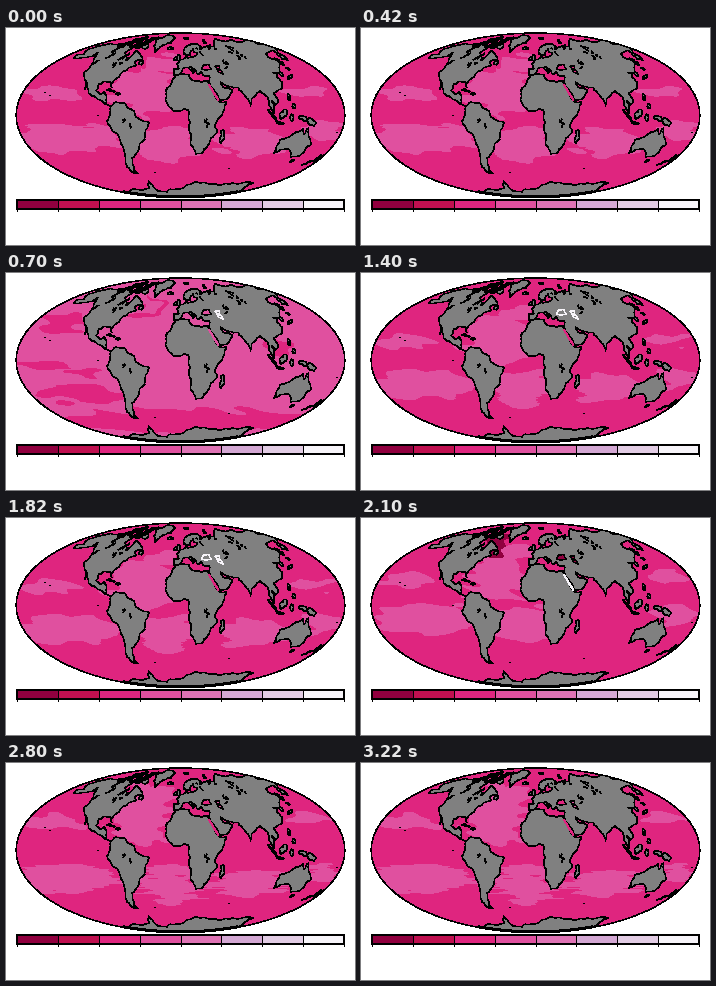
A matplotlib script that plays this animation: 349x217 px, repeating every 3.5 s.

```python
import numpy as np
import matplotlib.pyplot as plt
from matplotlib.animation import FuncAnimation
from matplotlib.colors import to_rgb
from matplotlib.patches import Ellipse, Polygon, Rectangle

W, H, DPI = 349, 217, 100
PX = 72 / DPI
HAIR = 0.45 * PX
CX, CY, RX, RY = 174.5, 87.3, 164.3, 82.3
SCALE = ["#91003f", "#c01050", "#df257f", "#e0509f",
         "#df73b5", "#d4a8d4", "#e2cce4", "#f7f4f9"]
WINE, DARK, LIGHT, PALE = SCALE[0], SCALE[2], SCALE[3], SCALE[7]
LAND = "#808080"
rng = np.random.default_rng(4)

# Key coast points as alternating longitude, latitude; detail is fractal
africa = [-6, 36, 10, 37, 11, 34, 20, 31, 32, 31, 34, 28, 37, 21, 43, 12, 51, 12,
          48, 5, 39, -7, 41, -15, 35, -20, 32, -28, 27, -34, 19, -35, 12, -17,
          9, -1, 9, 4, 4, 6, -8, 4, -17, 14, -17, 22, -10, 31]
europe = [34, 31, 36, 36, 28, 37, 27, 40, 23, 37, 19, 42, 13, 45, 18, 40, 16, 38,
          10, 44, 3, 43, -2, 37, -9, 37, -9, 43, -2, 43, -5, 48, 8, 54, 9, 57,
          11, 54, 20, 55, 29, 60, 22, 61, 25, 65, 17, 61, 16, 57, 6, 58, 5, 62,
          14, 68, 25, 71, 41, 67, 35, 64, 54, 68]
asia = [68, 68, 80, 73, 104, 78, 113, 74, 140, 73, 180, 69, 180, 65, 163, 59,
        157, 51, 156, 57, 164, 62, 142, 59, 135, 55, 141, 53, 140, 48, 128, 40,
        129, 36, 126, 35, 125, 39, 118, 39, 122, 37, 119, 35, 122, 30, 118, 24,
        106, 20, 109, 13, 105, 9, 101, 13, 103, 2, 98, 9, 98, 16, 91, 22, 80, 15,
        77, 8, 73, 17, 67, 25, 57, 26, 48, 30, 51, 25, 60, 22, 55, 17, 44, 13,
        39, 21, 35, 28]
north_america = [-168, 66, -156, 71, -128, 70, -95, 68, -85, 69, -94, 60, -82, 54,
                 -80, 51, -77, 58, -78, 62, -65, 58, -56, 52, -66, 50, -61, 46,
                 -70, 43, -76, 35, -81, 31, -80, 25, -84, 30, -97, 28, -97, 22,
                 -91, 19, -87, 21, -83, 15, -83, 10, -77, 8, -88, 13, -95, 16,
                 -105, 20, -113, 31, -110, 23, -118, 34, -124, 40, -124, 48,
                 -140, 60, -164, 54, -158, 58, -165, 61]
south_america = [-77, 8, -72, 12, -62, 11, -51, 4, -50, 0, -35, -6, -39, -13,
                 -41, -22, -48, -26, -54, -34, -62, -39, -69, -52, -66, -55,
                 -72, -54, -75, -48, -70, -18, -76, -14, -81, -5, -77, 4]
greenland = [-73, 78, -60, 82, -32, 83, -18, 80, -22, 72, -40, 65, -43, 60, -54, 68]
antarctica = [-180, -79, -120, -74, -75, -73, -58, -63, -62, -74, -40, -78, -25, -74,
              10, -70, 50, -66, 100, -66, 140, -66, 170, -77, 180, -79]
australia = [114, -22, 129, -15, 136, -12, 139, -17, 142, -11, 153, -26, 150, -37,
             140, -38, 131, -31, 115, -34]
black_sea = [28, 42, 31, 46, 39, 47, 41, 42]
caspian = [47, 45, 53, 46, 51, 42, 54, 37, 49, 39]
red_sea = [34, 27, 38, 20, 42, 14]

# Islands: centre longitude, latitude, half-width, half-height, slant
islands = [
    (135, -3, 5, 2, -.3), (144, -6, 5, 3, -.4), (113, 1, 4, 4, .5),
    (101, 0, 5, 1.5, -1), (110, -7, 4, .8, -.1), (122, -2, 2, 3, 0),
    (122, 16, 1.5, 3, 0), (125, 8, 2, 2, 0), (136, 35, 5, 1, .4),
    (143, 43, 2, 1.3, 0), (143, 50, .8, 4, 0), (47, -19, 2, 6, .6),
    (176, -39, 1.5, 3, 0), (170, -44, 3, 1, .8), (147, -42, 1.5, 1.5, 0),
    (-3, 54, 2.5, 4, -.2), (-8, 53, 2, 2, 0), (-19, 65, 5, 1.5, 0),
    (-80, 22, 5, .6, -.2), (-71, 19, 3, .8, 0), (-56, 49, 3, 2, 0),
    (18, 79, 8, 1.5, 0), (59, 74, 5, 2, .4), (-72, 68, 9, 3, -.3)]

# Ocean gyres in pixels: centre x, y, half-width, half-height
north_gyres = [(136, 63, 32, 25), (155, 36, 22, 8), (45, 65, 30, 7), (306, 62, 22, 6)]
south_gyres = [(60, 109, 52, 15), (163, 114, 30, 19), (316, 104, 20, 10)]
indian_gyre = (247, 113, 38, 14)
cold_pools = [(137, 34, 22, 12), (58, 50, 23, 9), (35, 92, 28, 4), (80, 99, 24, 4),
              (78, 121, 38, 9), (178, 148, 130, 12), (273, 74, 10, 8)]
hudson = (132, 28, 15, 13)


def season(north, south, indian):
    """Gyres drifting north or south with the time of year."""
    pools = [(x, y + north, rx, ry) for x, y, rx, ry in north_gyres]
    pools += [(x, y + south, rx, ry) for x, y, rx, ry in south_gyres]
    if indian:
        x, y, rx, ry = indian_gyre
        pools.append((x, y + south, rx, ry))
    return pools


# base, pool colour, pools, streak length, bay, black sea, caspian, red sea
SCENES = [
    (DARK, LIGHT, season(1, 1, True), 1, DARK, DARK, DARK, DARK),
    (LIGHT, DARK, cold_pools, 1, LIGHT, LIGHT, PALE, LIGHT),
    (DARK, LIGHT, season(4, 2, True), 1, DARK, PALE, PALE, DARK),
    (DARK, LIGHT, season(-3, -8, False), 1, WINE, WINE, WINE, PALE),
    (DARK, LIGHT, season(-6, 7, True), 5, LIGHT, DARK, LIGHT, DARK),
]


def pairs(flat):
    return np.array(flat, float).reshape(-1, 2)


def mollweide(pts):
    t = np.linspace(-np.pi / 2, np.pi / 2, 2001)
    lat = np.degrees(np.arcsin(np.clip((2 * t + np.sin(2 * t)) / np.pi, -1, 1)))
    theta = np.interp(pts[:, 1], lat, t)
    x = CX + RX * np.cos(theta) * pts[:, 0] / 180
    return np.column_stack([x, CY - RY * np.sin(theta)])


def roughen(pts, rounds=3, amount=0.14):
    """Split every edge of a closed outline, shifting midpoints sideways."""
    for _ in range(rounds):
        edge = np.roll(pts, -1, axis=0) - pts
        normal = np.column_stack([-edge[:, 1], edge[:, 0]])
        shift = rng.uniform(-amount, amount, (len(pts), 1))
        mid = pts + edge / 2 + normal * shift
        pts = np.stack([pts, mid], axis=1).reshape(-1, 2)
    return pts


def ripple(x, y, reach):
    """Smooth wobble made of a few random waves."""
    total = np.zeros_like(x)
    for _ in range(7):
        kx, ky = rng.uniform(-0.2, 0.2), rng.uniform(-0.6, 0.6)
        total += np.sin(kx * x + ky * y + rng.uniform(0, 2 * np.pi))
    return total * reach / 2.5


def paint(base, tint, pools, streak, bay):
    y, x = np.mgrid[0:H, 0:W] + 0.5
    wx = x + ripple(x, y, 8) + rng.normal(0, streak, (H, 1)) * (y > 95)
    wy = y + ripple(x, y, 2)
    image = np.empty((H, W, 3))
    image[:] = to_rgb(base)
    for (px, py, rx, ry), color in [(p, tint) for p in pools] + [(hudson, bay)]:
        inside = ((wx - px) / rx) ** 2 + ((wy - py) / ry) ** 2 < 1
        image[inside] = to_rgb(color)
    return image


fig = plt.figure(figsize=(W / DPI, H / DPI), dpi=DPI, facecolor="white")
ax = fig.add_axes([0, 0, 1, 1])
ax.set(xlim=(0, W), ylim=(H, 0))
ax.axis("off")

globe = Ellipse((CX, CY), 2 * RX, 2 * RY, fc="none", ec="black",
                lw=HAIR, antialiased=False, zorder=5)
ax.add_patch(globe)


def add_shape(pts, rounds=3, amount=0.14):
    shape = Polygon(roughen(pts, rounds, amount), fc=LAND, ec="black", lw=HAIR,
                    antialiased=False, zorder=2)
    ax.add_patch(shape)
    shape.set_clip_path(globe)
    return shape


def add_coast(flat):
    return add_shape(mollweide(pairs(flat)))


def add_island(lon, lat, rx, ry, slant=0):
    a = np.linspace(0, 2 * np.pi, 9)[:-1]
    ring = np.column_stack([lon + rx * np.cos(a),
                            lat + ry * np.sin(a) + slant * rx * np.cos(a)])
    add_shape(mollweide(ring), 1, 0.3)


images = [paint(*scene[:5]) for scene in SCENES]
ocean = ax.imshow(images[0], extent=(0, W, H, 0), interpolation="nearest",
                  aspect="auto", zorder=1)
ocean.set_clip_path(globe)

for coast in (africa, europe + asia, north_america, south_america, greenland,
              australia):
    add_coast(coast)
below = [[CX + 60, H], [CX - 60, H]]
add_shape(np.vstack([mollweide(pairs(antarctica)), below]))
for island in islands:
    add_island(*island)

# Crowded Arctic islands
for _ in range(45):
    size = rng.uniform(0.6, 1.8)
    add_island(rng.uniform(-125, -74), rng.uniform(66, 80), 2.5 * size, size)

# Lakes and rivers as short random walks over north, west and tropical land
for west, east, south, north, count in [(-120, -85, 48, 66, 14), (30, 120, 45, 68, 16),
                                        (-70, -52, -12, 2, 3), (15, 34, -10, 10, 3)]:
    for _ in range(count):
        start = [rng.uniform(west, east), rng.uniform(south, north)]
        walk = start + np.cumsum(rng.normal(0, 1.1, (5, 2)), axis=0)
        ax.plot(*mollweide(walk).T, color="black", lw=HAIR, antialiased=False, zorder=3)

# Remote islets
for x, y in [(38, 64), (43, 67), (91, 87), (148, 144), (222, 140), (330, 104)]:
    ax.add_patch(Rectangle((x, y), 2, 1, fc="black", lw=0, antialiased=False, zorder=3))

seas = [add_coast(black_sea), add_coast(caspian)]
strait, = ax.plot(*mollweide(pairs(red_sea)).T, lw=PX, antialiased=False, zorder=3)

# Heavy rim along the southern edge
a = np.linspace(np.radians(70), np.radians(110), 60)
ax.plot(CX + RX * np.cos(a), CY + (RY - 0.7) * np.sin(a), color="black",
        lw=2 * PX, antialiased=False, zorder=5)

# Colour scale
LEFT, RIGHT, TOP, BOTTOM = 11, 338, 172, 181
edges = np.linspace(LEFT, RIGHT, len(SCALE) + 1)
for x, color in zip(edges, SCALE):
    ax.add_patch(Rectangle((x, TOP), edges[1] - LEFT, BOTTOM - TOP, fc=color, lw=0,
                           antialiased=False))
ax.vlines(edges, TOP - 1.5, BOTTOM + 1.5, color="black", lw=PX, antialiased=False)
ax.add_patch(Rectangle((LEFT, TOP), RIGHT - LEFT, BOTTOM - TOP, fc="none",
                       ec="black", lw=2 * PX, antialiased=False))


def update(i):
    ocean.set_data(images[i])
    for sea, color in zip(seas, SCENES[i][5:7]):
        salt = color == PALE
        sea.set_facecolor(LAND if salt else color)
        sea.set_edgecolor(PALE if salt else "black")
    strait.set_color(SCENES[i][7])
    return [ocean, strait, *seas]


anim = FuncAnimation(fig, update, frames=len(SCENES), interval=700,
                     repeat=True, repeat_delay=0)
plt.show()
```
